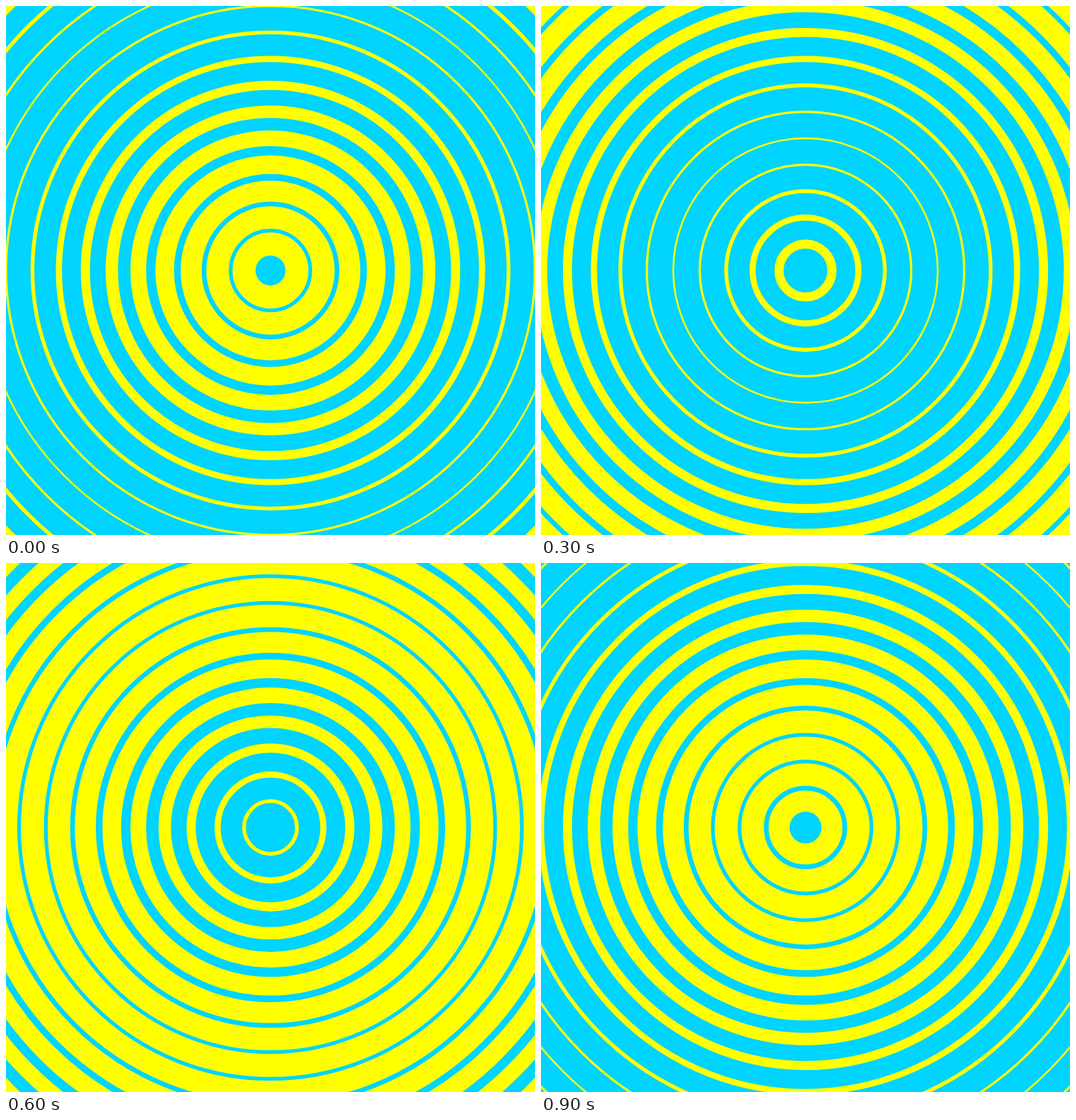
Write an HTML page that moves like this. It is 748 px wide and 748 px high and loops after 1000 ms.

```html
<!DOCTYPE html>
<html lang="en">
<head>
<meta charset="utf-8">
<title>Pulsing rings</title>
<style>
  html, body { margin: 0; height: 100%; overflow: hidden; background: #00d4ff; }
  svg { display: block; width: 100vw; height: 100vh; }
  circle { fill: none; stroke: #ff0; }
</style>
</head>
<body>
<svg viewBox="-374 -374 748 748"></svg>
<script>
const COUNT = 15, GAP = 37.4, STEPS = 10, LOOP = 1000;
const svg = document.querySelector('svg');

const rings = Array.from({ length: COUNT }, (_, i) => {
  const ring = document.createElementNS('http://www.w3.org/2000/svg', 'circle');
  ring.setAttribute('r', GAP * (i + 1));
  return svg.appendChild(ring);
});

// A wave of stroke widths travels inward, in ten hard steps per loop.
function draw(now) {
  const step = Math.floor((now % LOOP) / LOOP * STEPS);
  rings.forEach((ring, i) => {
    const phase = 2 * Math.PI * (i / 20 + step / STEPS);
    ring.setAttribute('stroke-width', 17.5 + 15 * Math.cos(phase));
  });
}

let start;
function tick(now) {
  start ??= now;
  draw(now - start);
  requestAnimationFrame(tick);
}

draw(0);
requestAnimationFrame(tick);
</script>
</body>
</html>
```
